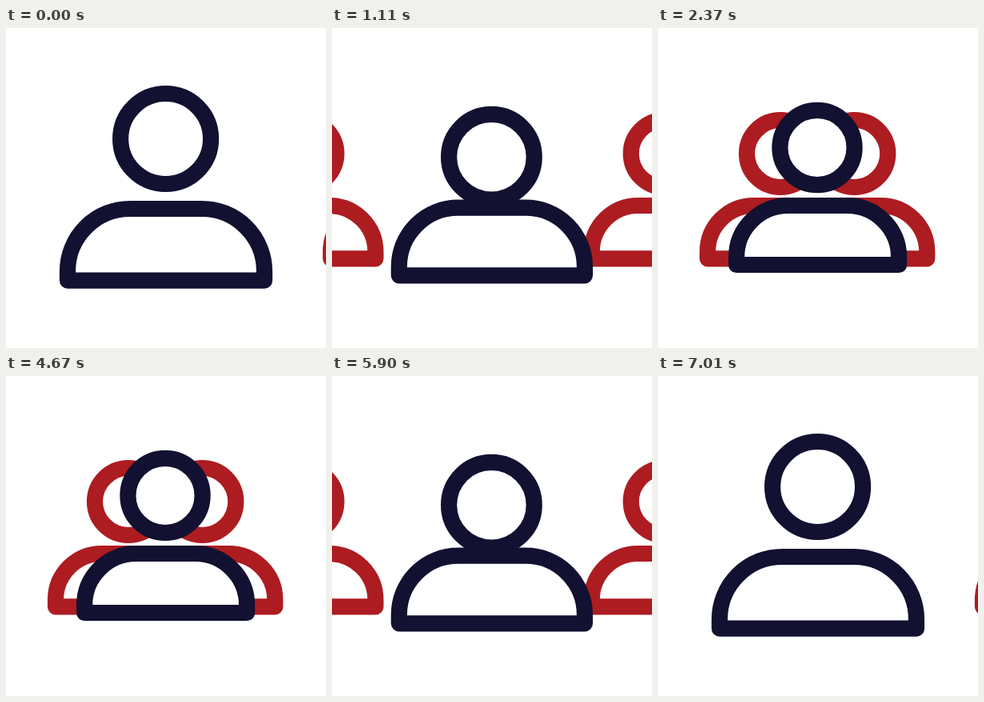
An HTML page that plays this animation: 400 by 400 pixels, repeating every 8040 ms.

```html
<!DOCTYPE html>
<html lang="en">
<head>
<meta charset="utf-8">
<title>People gather</title>
<style>
  html, body { margin: 0; height: 100%; overflow: hidden; background: #fff; }
  svg { display: block; width: 100%; height: 100%; }
  path, circle { fill: #fff; stroke: #121131; stroke-width: 20.2; stroke-linejoin: round; }
  .side * { stroke: #ad1c21; }
</style>
</head>
<body>
<svg viewBox="0 0 400 400">
  <g id="left" class="side"><path/><circle/></g>
  <g id="right" class="side"><path/><circle/></g>
  <g id="main"><path/><circle/></g>
</svg>
<script>
const LOOP = 8040, GATHERED = 2370, LEAVE = 4670, ALONE = 7010, STEP = 30;

// Height of the main head: [time, centre y]
const HEAD_KEYS = [[0, 138.5], [600, 110.5], [1200, 164.5], [1660, 137.8], [2400, 149.6]];

const clamp = v => Math.min(1, Math.max(0, v));
const mix = (a, b, k) => a + (b - a) * k;
const smooth = s => s * s * (3 - 2 * s);
const snap = t => Math.floor(t / STEP) * STEP;

// cubic-bezier(.6, 0, .4, 1)
function ease(x) {
  let lo = 0, hi = 1;
  for (let i = 0; i < 24; i++) {
    const s = (lo + hi) / 2, r = 1 - s;
    if (1.8 * s * r * r + 1.2 * s * s * r + s ** 3 < x) lo = s; else hi = s;
  }
  return smooth(lo);
}

function headY(p) {
  const i = Math.max(1, HEAD_KEYS.findIndex(([time]) => p <= time));
  const [t0, y0] = HEAD_KEYS[i - 1], [t1, y1] = HEAD_KEYS[i];
  return mix(y0, y1, smooth((p - t0) / (t1 - t0)));
}

function person(id, x, top, half, headX, headY, radius) {
  const [body, head] = document.getElementById(id).children;
  const r = half * 0.635, bottom = top + half * 0.729;
  body.setAttribute('d', `M${x - half} ${bottom}V${top + r}a${r} ${r} 0 0 1 ${r} ${-r}` +
    `H${x + half - r}a${r} ${r} 0 0 1 ${r} ${r}V${bottom}z`);
  head.setAttribute('cx', headX);
  head.setAttribute('cy', headY);
  head.setAttribute('r', radius);
}

function draw(now) {
  const t = now % LOOP;
  const p = t < LEAVE
    ? Math.min(snap(t), GATHERED)
    : Math.max(0, ALONE - LEAVE - snap(t - LEAVE));
  const k = ease(clamp((p - 600) / 1200));
  const leftX = mix(-127, 153, k), rightX = mix(497, 245.3, k);
  person('left', leftX, 222, 91, leftX, 157, 42);
  person('right', rightX, 222, 91, rightX, 157, 42);
  person('main', mix(200, 199.6, k), mix(226, 222, k), mix(123, 101.5, k),
    mix(199.6, 199, k), headY(p), mix(56.5, 46.6, k));
}

const start = performance.now();
function tick() {
  draw(performance.now() - start);
  requestAnimationFrame(tick);
}
tick();
</script>
</body>
</html>
```
